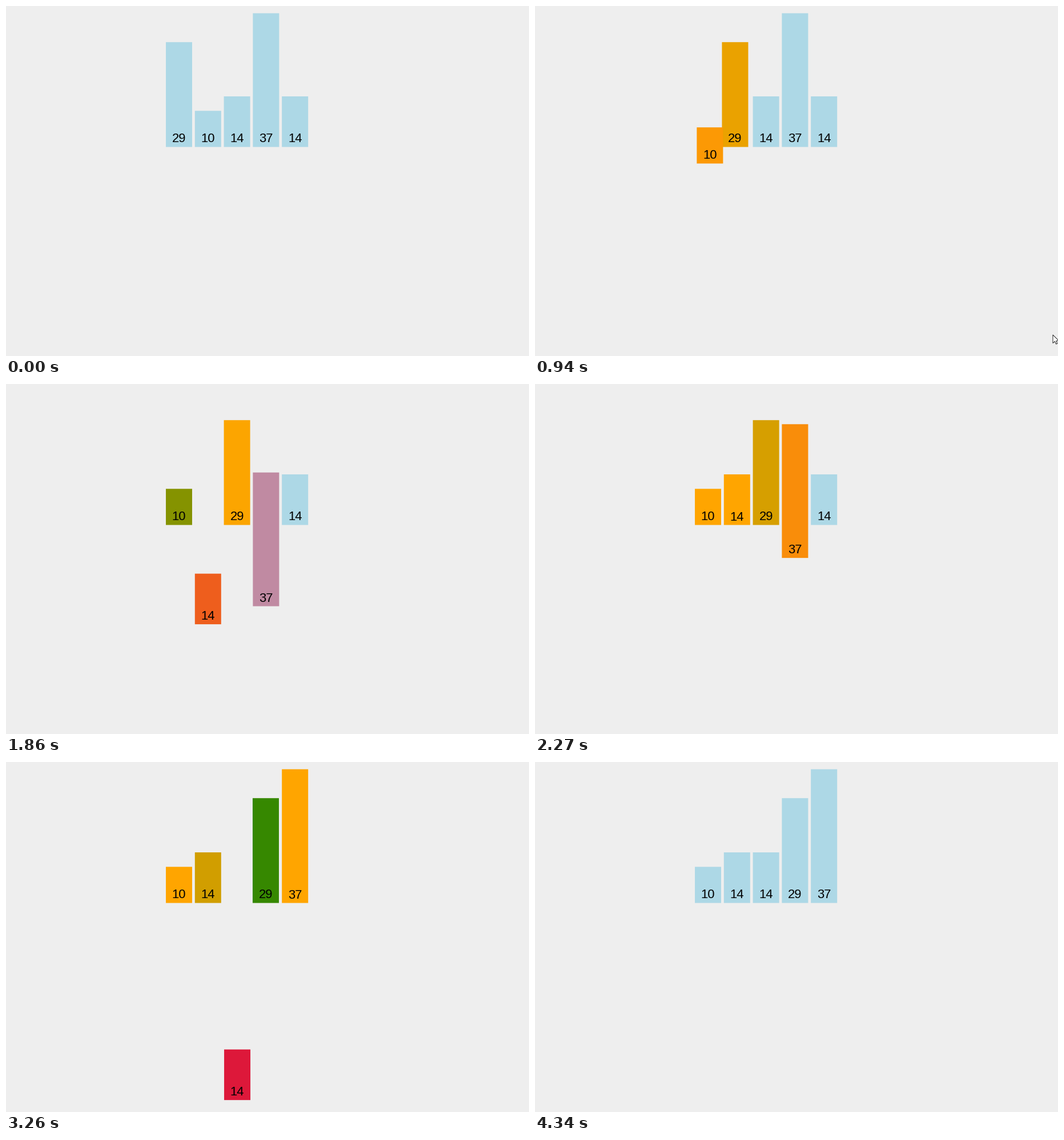
Write a matplotlib script that moves like this. It is 916x612 px and loops after 4.59 s.

```python
import numpy as np
import matplotlib.pyplot as plt
from matplotlib.animation import FuncAnimation
from matplotlib.patches import Polygon, Rectangle

WIDTH, HEIGHT, DPI = 916, 612, 100
LOOP_MS, INTERVAL = 4590, 17
HOLD = 77.7        # each pose stays on screen this long, in ms
DURATION = 200     # full length of one eased transition, in ms

VALUES = [29, 10, 14, 37, 14]
LEFT, PITCH, BAR_WIDTH = 280, 50.8, 46
BASELINE, DROP, UNIT = 246.5, 355.5, 6.32

BLUE = (173, 216, 230)
ORANGE = (255, 165, 0)
GREEN = (0, 128, 0)
RED = (220, 20, 60)


def at(slot, colour, lowered=0):
    return [slot, lowered, *colour]


# Start time and the new targets of the bars, keyed by their initial index.
# A new step interrupts whatever is still moving.
STEPS = [
    (30, {0: at(0, ORANGE)}),
    (260, {1: at(1, RED, 1)}),
    (490, {0: at(0, GREEN)}),
    (715, {0: at(1, GREEN), 1: at(0, RED, 1)}),
    (787, {0: at(1, ORANGE), 1: at(0, ORANGE)}),
    (1046, {2: at(2, RED, 1)}),
    (1208, {0: at(1, GREEN)}),
    (1280, {0: at(2, GREEN), 2: at(1, RED, 1)}),
    (1535, {0: at(2, ORANGE), 1: at(0, GREEN)}),
    (1700, {1: at(0, ORANGE), 2: at(1, ORANGE)}),
    (1772, {3: at(3, RED, 1)}),
    (1948, {0: at(2, GREEN)}),
    (2122, {0: at(2, ORANGE), 3: at(3, ORANGE)}),
    (2296, {4: at(4, RED, 1)}),
    (2469, {3: at(3, GREEN)}),
    (2640, {3: at(4, GREEN), 4: at(3, RED, 1)}),
    (2810, {3: at(4, ORANGE), 0: at(2, GREEN)}),
    (2980, {0: at(3, GREEN), 4: at(2, RED, 1)}),
    (3152, {0: at(3, ORANGE), 2: at(1, GREEN)}),
    (3224, {2: at(1, ORANGE), 4: at(2, ORANGE)}),
    (3440, {bar: at(slot, BLUE) for slot, bar in enumerate([1, 2, 4, 0, 3])}),
]

# Pointer passes: (first pose, last pose, way points)
POINTER_PASSES = [
    (7, 12, [(857, 549), (907, 575)]),
    (52, 55, [(902, 596), (880, 560), (863, 533), (888, 572)]),
]
ARROW = np.array([(0, 0), (0, 14.5), (3.4, 11.4), (5.6, 16.2),
                  (7.8, 15.2), (5.7, 10.5), (10.2, 10.2)])


def ease(p):
    p = min(max(p, 0), 1)
    return 4 * p ** 3 if p < 0.5 else 1 - 4 * (1 - p) ** 3


def pose(time):
    target = np.array([at(i, BLUE) for i in range(len(VALUES))], float)
    current = target.copy()
    ends = [start for start, _ in STEPS[1:]] + [LOOP_MS]
    for (start, changes), end in zip(STEPS, ends):
        if time < start:
            break
        for bar, goal in changes.items():
            target[bar] = goal
        current += (target - current) * ease((min(time, end) - start) / DURATION)
    return current


def pointer_position(tick):
    for first, last, path in POINTER_PASSES:
        if first <= tick <= last:
            xs, ys = zip(*path)
            stops = np.linspace(first, last, len(path))
            return np.interp(tick, stops, xs), np.interp(tick, stops, ys)
    return None


fig = plt.figure(figsize=(WIDTH / DPI, HEIGHT / DPI), dpi=DPI, facecolor="#eeeeee")
ax = fig.add_axes([0, 0, 1, 1])
ax.set_xlim(0, WIDTH)
ax.set_ylim(HEIGHT, 0)
ax.axis("off")

bars, labels = [], []
for z, value in enumerate(VALUES):
    bars.append(ax.add_patch(
        Rectangle((0, 0), BAR_WIDTH, value * UNIT, linewidth=0, snap=False,
                  zorder=2 + z)))
    labels.append(ax.text(0, 0, str(value), family="Liberation Sans",
                          size=22 * 72 / DPI, color="black",
                          ha="center", va="baseline", zorder=2.5 + z))
pointer = ax.add_patch(Polygon(ARROW, facecolor="white", edgecolor="black",
                               linewidth=0.6, zorder=10))


def draw(frame):
    tick = int((frame + 1) * INTERVAL / HOLD)
    for bar, label, value, (slot, lowered, *rgb) in zip(
            bars, labels, VALUES, pose(tick * HOLD)):
        x, bottom = LEFT + slot * PITCH, BASELINE + lowered * DROP
        bar.set_xy((x, bottom - value * UNIT))
        bar.set_facecolor(np.clip(np.array(rgb) / 255, 0, 1))
        label.set_position((x + BAR_WIDTH / 2, bottom - 8))
    tip = pointer_position(tick)
    pointer.set_visible(tip is not None)
    if tip is not None:
        pointer.set_xy(ARROW + tip)
    return [*bars, *labels, pointer]


anim = FuncAnimation(fig, draw, frames=LOOP_MS // INTERVAL, interval=INTERVAL,
                     repeat=True, repeat_delay=0)
plt.show()
```
